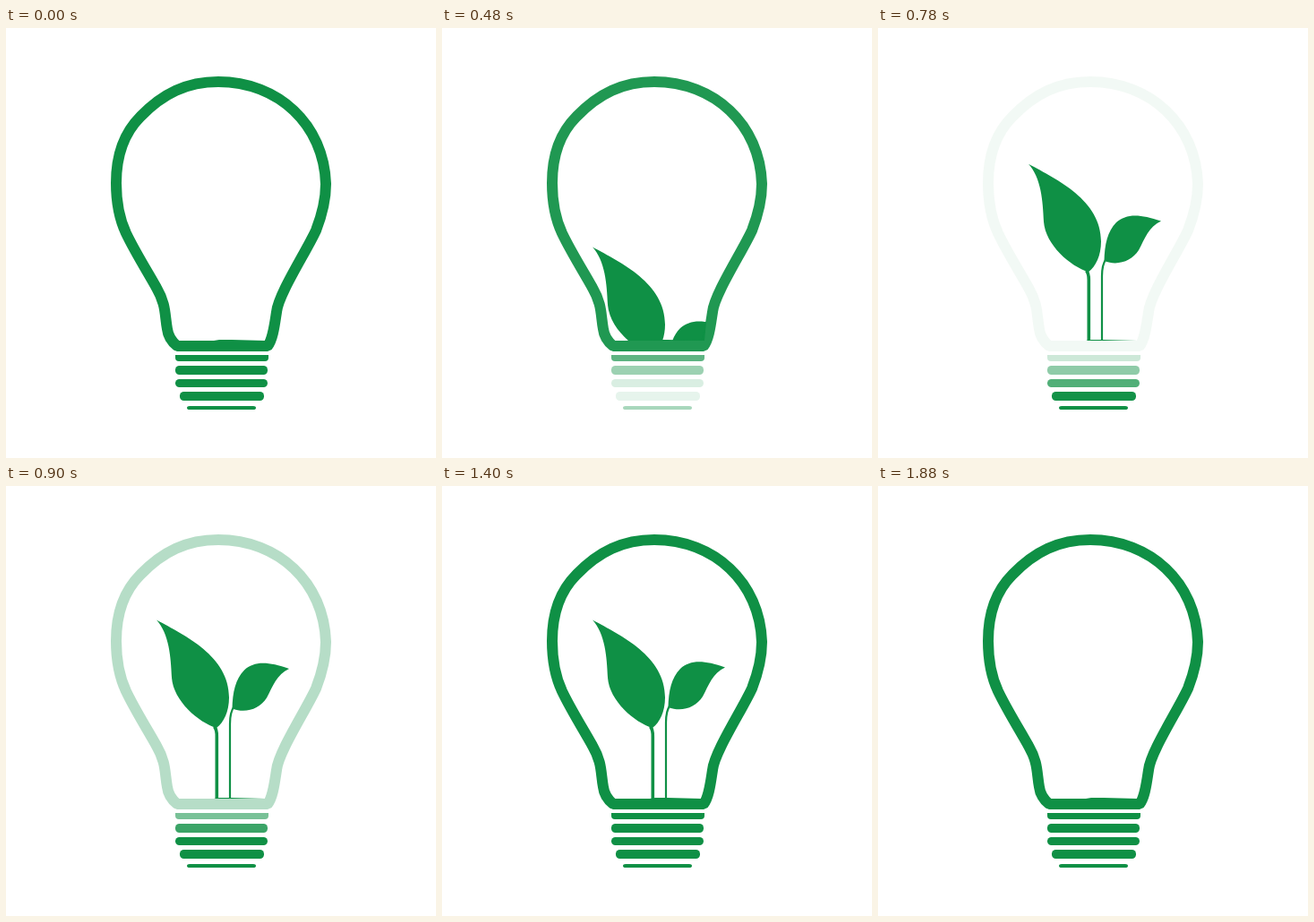
An HTML page for the animation above (2140 ms loop, 480x480 px).

```html
<!DOCTYPE html>
<html lang="en">
<head>
<meta charset="utf-8">
<title>Green bulb</title>
<style>
  html, body { margin: 0; width: 100%; height: 100%; overflow: hidden; background: #fff; }
  svg { display: block; width: 100vw; height: 100vh; }
  .fill { fill: #0f9045; }
  .line { fill: none; stroke: #0f9045; }
</style>
</head>
<body>
<svg viewBox="0 0 480 480">
  <defs>
    <clipPath id="inside">
      <path d="M125 40H355V180L340 225L303 290L296 318L293 349H190L185 325L175 290L140 225L125 180Z"/>
    </clipPath>
  </defs>

  <g clip-path="url(#inside)">
    <g id="leftLeaf">
      <path class="fill" d="M168 149.5C200 167 249 190 249 236C249 252 243 264 235 270C215 264 187 240 185 214C184 190 182 165 168 149.5Z"/>
      <path class="line" stroke-width="3.6" d="M232.5 268.5Q235.5 272 235.3 280V349"/>
    </g>
    <g id="rightLeaf">
      <path class="fill" d="M316 202.5C292 194 277 194 266 204C256 214 253 229 252.5 247C268 253 283 247 291 235C298 222 302 209 316 202.5Z"/>
      <path class="line" stroke-width="2.2" d="M254.5 245Q250 251 250 264V349"/>
    </g>
  </g>
  <path class="fill" d="M232 349L238 348H252L289 349Z"/>

  <path class="line fade" stroke-width="12" stroke-linejoin="bevel" d="M191 355H292C298 348 300 330 302 317C304 297 335 250 346 226C353 208 357 190 357 174C355 108 304 60 237 60C202 60 175 73 150 99C130 119 123 145 123 173C123 193 127 214 134 229C144 250 158 272 168 290C179 309 177 320 180 336C181 345 185 350 191 355Z"/>
  <path class="fill fade" d="M189 365H293V368Q293 372 289 372H193Q189 372 189 368Z"/>
  <rect class="fill fade" x="189" y="377" width="103" height="10" rx="4.5"/>
  <rect class="fill fade" x="189" y="392" width="103" height="9" rx="4.5"/>
  <rect class="fill fade" x="194" y="406" width="94" height="10" rx="4.5"/>
  <rect class="fill fade" x="202" y="422" width="77" height="4" rx="3" ry="2"/>
</svg>
<script>
  const LOOP = 2140, STEP = 60, GROWN = 1140, SINK = 1400, GONE = 1880;
  const FADE_HALF = 342, FADE_START = 455, FADE_STAGGER = 88;
  const GROW_TIME = 855;

  const leaves = [
    { node: document.getElementById('leftLeaf'), start: 46, depth: 199 },
    { node: document.getElementById('rightLeaf'), start: 155, depth: 168 }
  ];
  const faders = [...document.querySelectorAll('.fade')];

  const clamp = v => Math.min(1, Math.max(0, v));
  const easeInOut = p => p < 0.5 ? 4 * p ** 3 : 1 - 4 * (1 - p) ** 3;
  const snap = t => Math.floor(t / STEP) * STEP;

  // The picture advances in fixed steps, with a rest after growing and after sinking.
  const stepTime = t => t < SINK
    ? Math.min(snap(t), GROWN)
    : Math.min(SINK + snap(t - SINK), GONE);

  function sunk(t, start) {
    return t < SINK
      ? 1 - easeInOut(clamp((t - start) / GROW_TIME))
      : clamp((t - SINK) / (GONE - SINK)) ** 2.4;
  }

  function draw(now) {
    const t = stepTime(now % LOOP);
    for (const { node, start, depth } of leaves) {
      node.setAttribute('transform', `translate(0 ${depth * sunk(t, start)})`);
      node.setAttribute('visibility', t === GONE || t === 0 ? 'hidden' : 'visible');
    }
    faders.forEach((node, i) => {
      const lowest = FADE_START - FADE_STAGGER * i + FADE_HALF;
      node.setAttribute('opacity', clamp(Math.abs(t - lowest) / FADE_HALF));
    });
  }

  const begin = performance.now();
  function tick() {
    draw(performance.now() - begin);
    requestAnimationFrame(tick);
  }
  tick();
</script>
</body>
</html>
```
